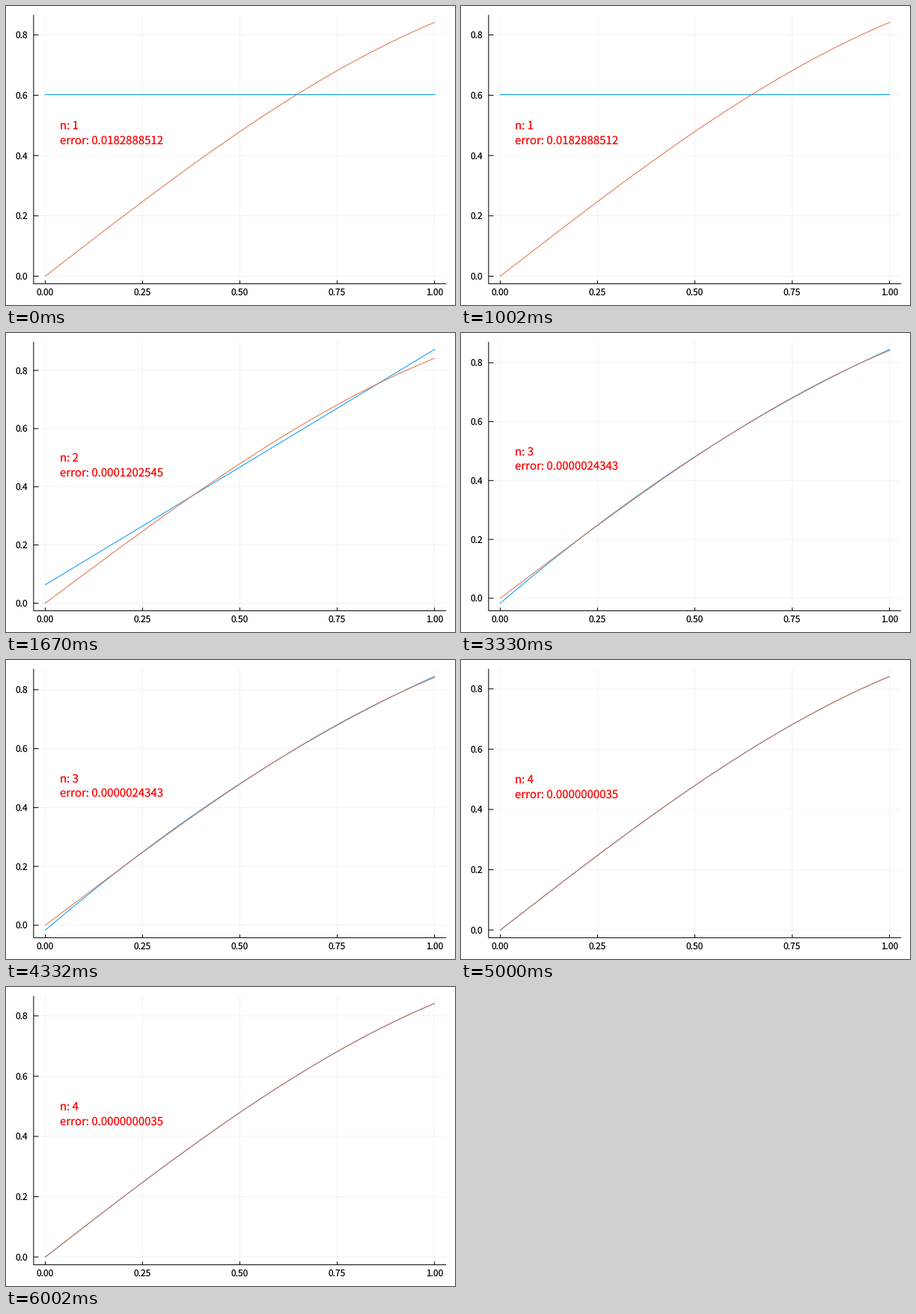
Recreate the animation shown at these times as a matplotlib script. Size 600 px wide and 400 px high, loop 6.67 s.

```python
import numpy as np
import matplotlib.pyplot as plt
from matplotlib.animation import FuncAnimation
from matplotlib.collections import LineCollection

plt.rcParams.update({
    "font.family": "Noto Sans CJK JP",
    "text.hinting": "none",
    "text.hinting_factor": 1,
})

DPI = 100
PX = 72 / DPI  # points per pixel
W, H = 600, 400
LEFT, RIGHT, TOP, BOTTOM = 36.87, 588.19, 11.81, 371.61
PAD = 0.03
TICK = 0.012  # tick length as a share of the plot area
BLUE, ORANGE = "#009afa", "#e26f46"
ERRORS = ["0.0182888512", "0.0001202545", "0.0000024343", "0.0000000035"]
STARTS = np.array([0, 1670, 3330, 5000])
LOOP, INTERVAL = 6670, 10

# Gauss nodes on [0, 1] for a least-squares fit of sin with weight x
nodes, weights = np.polynomial.legendre.leggauss(20)
nodes, weights = (nodes + 1) / 2, weights / 2

xs = np.linspace(0, 1, 201)
sine = np.sin(xs)
x_ticks = np.linspace(0, 1, 5)
y_ticks = np.arange(5) / 5


def best_polynomial(n):
    coeffs = np.polyfit(nodes, np.sin(nodes), n - 1, w=np.sqrt(weights * nodes))
    return np.polyval(coeffs, xs)


def to_px_x(x):
    return LEFT + (x + PAD) / (1 + 2 * PAD) * (RIGHT - LEFT)


def y_scale(low, high):
    margin = PAD * (high - low)
    low, high = low - margin, high + margin
    return lambda y: BOTTOM - (y - low) / (high - low) * (BOTTOM - TOP)


def verticals(x, y0, y1):
    return [[(v, y0), (v, y1)] for v in x]


def horizontals(y, x0, x1):
    return [[(x0, v), (x1, v)] for v in y]


fig = plt.figure(figsize=(W / DPI, H / DPI), dpi=DPI, facecolor="white")
ax = fig.add_axes([0, 0, 1, 1])
ax.axis("off")
ax.set(xlim=(0, W), ylim=(H, 0))


def add_strokes(segments, **style):
    strokes = LineCollection(segments, color="black", snap=False, **style)
    return ax.add_collection(strokes, autolim=False)


def add_curve(color):
    return ax.plot([], [], color=color, lw=PX, snap=False)[0]


def add_text(x, y, text, size, **style):
    return ax.text(x, y, text, fontsize=size * PX, va="baseline", **style)


tick_px = to_px_x(x_ticks)
add_strokes(verticals(tick_px, TOP, BOTTOM), lw=0.5 * PX, alpha=0.1)
add_strokes([[(LEFT, TOP), (LEFT, BOTTOM), (RIGHT, BOTTOM)]], lw=PX)
add_strokes(verticals(tick_px, BOTTOM, BOTTOM - TICK * (BOTTOM - TOP)), lw=PX)
for x, px in zip(x_ticks, tick_px):
    add_text(px, 387, f"{x:.2f}", 12, ha="center")

y_grid = add_strokes([], lw=0.5 * PX, alpha=0.1)
y_marks = add_strokes([], lw=PX)
y_labels = [add_text(28.7, 0, f"{y:.1f}", 12, ha="right") for y in y_ticks]

fit_line, sine_line = add_curve(BLUE), add_curve(ORANGE)
degree_label = add_text(to_px_x(0.0625), 0, "", 15, ha="center", color="red")
error_label = add_text(to_px_x(0.17), 0, "", 15, ha="center", color="red")


def update(frame):
    n = int(np.sum(STARTS <= frame * INTERVAL))
    fit = best_polynomial(n)
    to_px_y = y_scale(min(fit.min(), sine.min()), max(fit.max(), sine.max()))
    levels = to_px_y(y_ticks)

    y_grid.set_segments(horizontals(levels, LEFT, RIGHT))
    y_marks.set_segments(horizontals(levels, LEFT, LEFT + TICK * (RIGHT - LEFT)))
    for text, level in zip(y_labels, levels):
        text.set_y(level + 4.4)

    fit_line.set_data(to_px_x(xs), to_px_y(fit))
    sine_line.set_data(to_px_x(xs), to_px_y(sine))
    degree_label.set(text=f"n: {n}", y=to_px_y(0.5) + 5.4)
    error_label.set(text=f"error: {ERRORS[n - 1]}", y=to_px_y(0.45) + 5.4)


anim = FuncAnimation(fig, update, frames=LOOP // INTERVAL, interval=INTERVAL,
                     repeat=True, repeat_delay=0)
plt.show()
```
